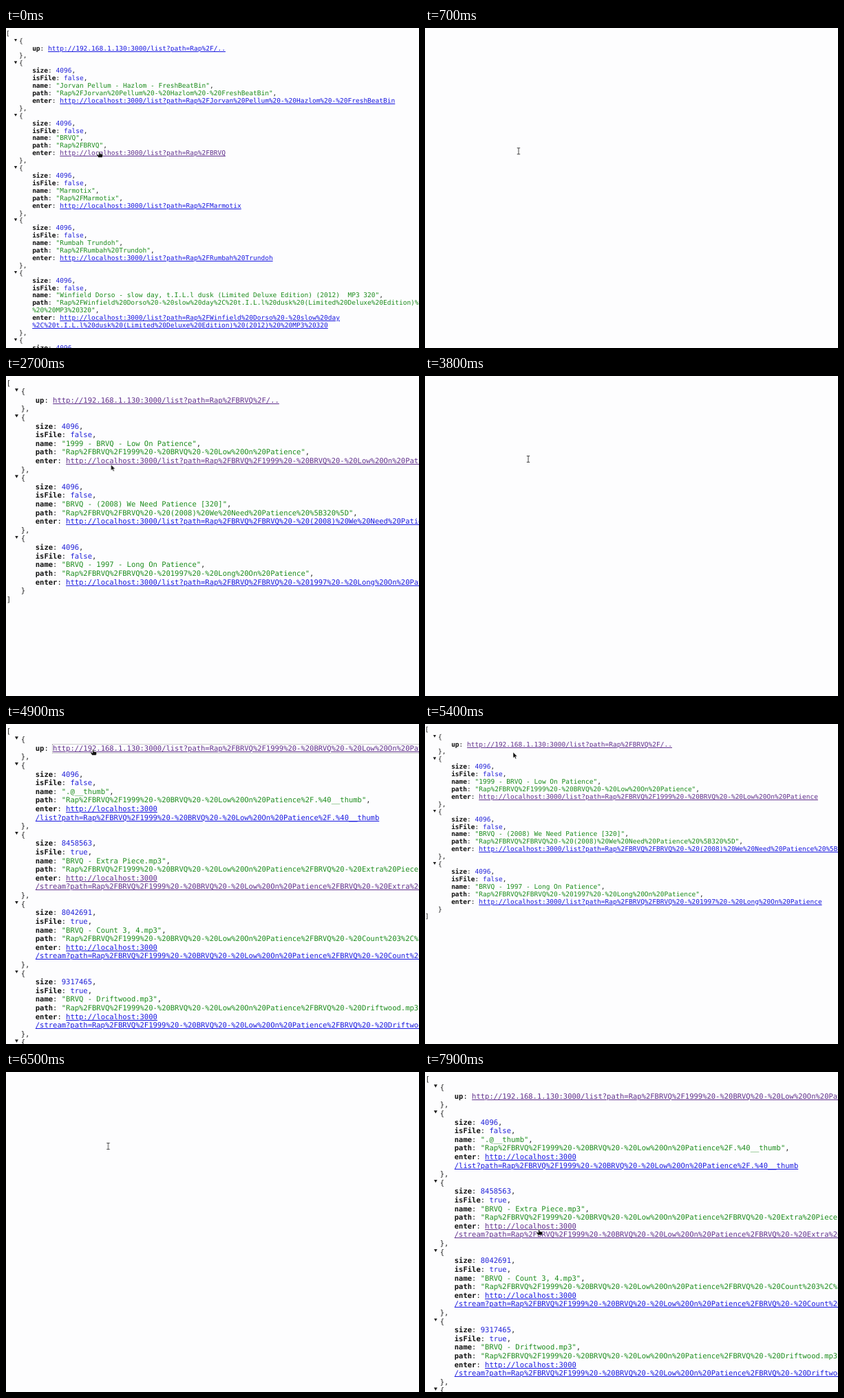
Write an HTML page that moves like this. It is 600 px wide and 466 px high and loops after 8 s.

```html
<!DOCTYPE html>
<html lang="en">
<head>
<meta charset="utf-8">
<title>JSON music browser</title>
<style>
html, body { margin: 0; width: 100%; height: 100%; overflow: hidden; background: #fdfdfe; }
#stage { position: relative; width: 600px; height: 466px; overflow: hidden; }
.page {
  position: absolute; left: 0; top: var(--top); width: 600px;
  font: var(--size)/var(--line) "DejaVu Sans Mono", monospace;
  text-rendering: geometricPrecision; color: #222; white-space: pre;
  visibility: hidden; animation: 8s step-end infinite;
}
.small { --size: 9.535px; --line: 10.907px; --top: 3.75px; --left: 0px; }
.large { --size: 10.5px; --line: 12.605px; --top: 4.5px; --left: .8px; }
.row { position: relative; padding-left: calc(var(--left) + var(--depth) * 2em); }
.fold {
  position: absolute; left: 1.23em; top: .1em; width: .48em; height: .43em;
  background: #222; clip-path: polygon(0 0, 100% 0, 50% 100%);
}
b { color: #111; }
.value { color: #2020d8; }
.string { color: #1c8c1c; }
.link { color: #1818e0; text-decoration: underline; }
.seen { color: #60308c; }

#root { animation-name: root; }
#group { animation-name: group; }
#album { animation-name: album; }
#back { animation-name: back; }
@keyframes root { 0% { visibility: visible } 7.5%, 100% { visibility: hidden } }
@keyframes group { 0% { visibility: hidden } 13.75% { visibility: visible } 47.5%, 100% { visibility: hidden } }
@keyframes album {
  0% { visibility: hidden } 53.75% { visibility: visible }
  62.5% { visibility: hidden } 87.5%, 100% { visibility: visible }
}
@keyframes back { 0% { visibility: hidden } 66.25% { visibility: visible } 76.25%, 100% { visibility: hidden } }

#album .up { outline: 1px dotted transparent; animation: focus 8s step-end infinite; }
@keyframes focus { 0% { outline-color: transparent } 60% { outline-color: #999 } 62.5%, 100% { outline-color: transparent } }

#cursor { position: absolute; left: 0; top: 0; overflow: visible; animation: move 8s ease-in-out infinite; }
#cursor path { visibility: hidden; animation: 8s step-end infinite; }
#cursor #hand { animation-name: hand; }
#cursor #arrow { animation-name: arrow; }
#cursor #beam { animation-name: beam; }
@keyframes move {
  0%, 7.5% { transform: translate(136px, 180px) }
  13.75%, 23.75% { transform: translate(135px, 171px) }
  32.5%, 33.75% { transform: translate(152.5px, 129px) }
  36.25%, 55% { transform: translate(150px, 121px) }
  60%, 63.75% { transform: translate(127px, 37px) }
  66.25%, 68.75% { transform: translate(128px, 41px) }
  73.75%, 90% { transform: translate(148.5px, 108px) }
  97.5%, 100% { transform: translate(166px, 229px) }
}
@keyframes hand {
  0% { visibility: visible } 7.5% { visibility: hidden }
  35.6% { visibility: visible } 47.5% { visibility: hidden }
  53.75% { visibility: visible } 55.6% { visibility: hidden }
  59.4% { visibility: visible } 62.5% { visibility: hidden }
  73.1% { visibility: visible } 76.25% { visibility: hidden }
  97%, 100% { visibility: visible }
}
@keyframes arrow {
  0% { visibility: hidden } 13.75% { visibility: visible } 35.6% { visibility: hidden }
  55.6% { visibility: visible } 59.4% { visibility: hidden }
  66.25% { visibility: visible } 73.1% { visibility: hidden }
  90.6% { visibility: visible } 97%, 100% { visibility: hidden }
}
@keyframes beam {
  0% { visibility: hidden } 7.5% { visibility: visible } 13.75% { visibility: hidden }
  47.5% { visibility: visible } 53.75% { visibility: hidden }
  62.5% { visibility: visible } 66.25% { visibility: hidden }
  76.25% { visibility: visible } 90.6%, 100% { visibility: hidden }
}
</style>
</head>
<body>
<div id="stage">
  <div class="page small" id="root"></div>
  <div class="page large" id="group"></div>
  <div class="page large" id="album"></div>
  <div class="page small" id="back"></div>
  <svg id="cursor" width="1" height="1">
    <path id="hand" d="M-1.2 0H.6V3L4.6 3.8V6.4L3.8 8.6H-1.8L-4.4 4.8-3.2 4-1.2 5.2Z" fill="#111" stroke="#fff" stroke-width=".5"/>
    <path id="arrow" d="M0 0V8.6L2 6.8 3.4 9.8 4.8 9.2 3.5 6.3H6Z" fill="#111" stroke="#fff" stroke-width=".5"/>
    <path id="beam" d="M-2.2-4.5H2.2M0-4.5V4.5M-2.2 4.5H2.2" fill="none" stroke="#444"/>
  </svg>
</div>
<script>
const HOST = 'http://localhost:3000';
const UP_HOST = 'http://192.168.1.130:3000';

const row = (depth, html) => `<div class="row" style="--depth:${depth}">${html}</div>`;
const open = row(1, '<span class="fold"></span>{');
const span = (kind, text) => `<span class="${kind}">${text}</span>`;
const field = (key, html) => row(2, `<b>${key}</b>: ${html}`);
const link = (url, seen, extra = '') => span(`link ${seen ? 'seen' : ''} ${extra}`, url);
const wrap = (text, mark) => mark ? text.replace(mark, '\n' + mark) : text;

// An item with a size is a file; the marks say where long lines wrap.
function entry(dir, { name, size, seen, pathMark, linkMark }) {
  const path = encodeURIComponent(`${dir}/${name}`);
  const url = `${HOST}/${size ? 'stream' : 'list'}?path=${path}`;
  return open +
    field('size', span('value', size || 4096) + ',') +
    field('isFile', span('value', !!size) + ',') +
    field('name', span('string', `"${name}"`) + ',') +
    field('path', span('string', `"${wrap(path, pathMark)}"`) + ',') +
    field('enter', link(wrap(url, linkMark), seen));
}

function fill(id, dir, upSeen, items) {
  const up = `${UP_HOST}/list?path=${encodeURIComponent(dir + '/')}/..`;
  const blocks = [open + field('up', link(up, upSeen, 'up')), ...items.map(item => entry(dir, item))];
  document.getElementById(id).innerHTML =
    row(0, '[') + blocks.join(row(1, '},')) + row(1, '}') + row(0, ']');
}

fill('root', 'Rap', false, [
  { name: 'Jorvan Pellum - Hazlom - FreshBeatBin' },
  { name: 'BRVQ', seen: true },
  { name: 'Marmotix' },
  { name: 'Rumbah Trundoh' },
  { name: 'Winfield Dorso - slow day, t.I.L.l dusk (Limited Deluxe Edition) (2012)  MP3 320',
    pathMark: '%20%20MP3', linkMark: '%2C' },
  { name: 'Mixed' }
]);

const records = [
  { name: '1999 - BRVQ - Low On Patience', seen: true },
  { name: 'BRVQ - (2008) We Need Patience [320]' },
  { name: 'BRVQ - 1997 - Long On Patience' }
];
fill('group', 'Rap/BRVQ', true, records);
fill('back', 'Rap/BRVQ', true, records);

const track = (title, size, seen) => ({ name: `BRVQ - ${title}.mp3`, size, seen, linkMark: '/stream' });
fill('album', 'Rap/BRVQ/' + records[0].name, true, [
  { name: '.@__thumb', linkMark: '/list' },
  track('Extra Piece', 8458563, true),
  track('Count 3, 4', 8042691),
  track('Driftwood', 9317465),
  track('Intro', 7120384)
]);
</script>
</body>
</html>
```
